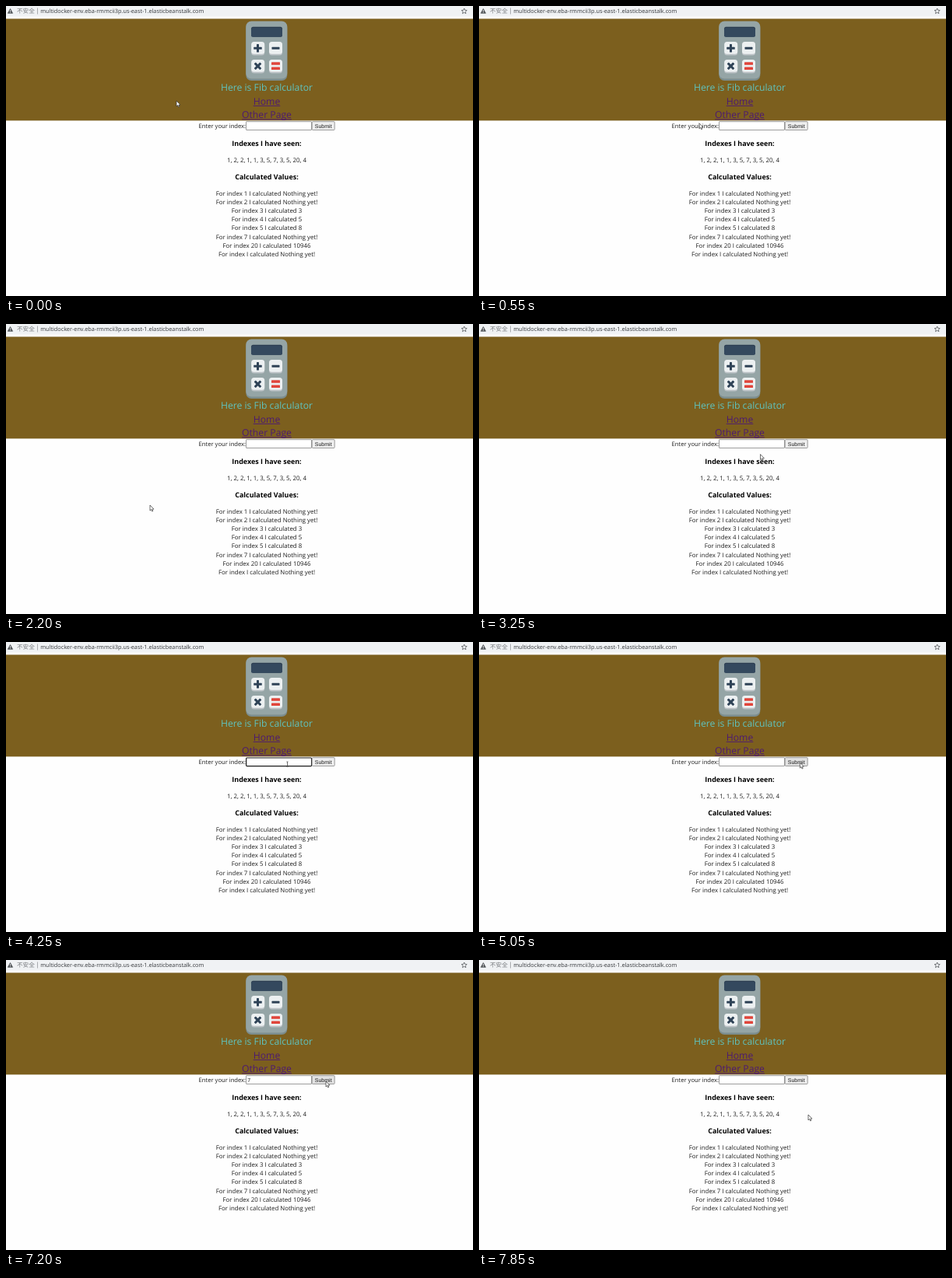
An HTML page with a canvas for the animation above (8 s loop, 600x373 px).

```html
<!DOCTYPE html>
<html lang="en">
<head>
<meta charset="utf-8">
<title>Fib calculator</title>
<style>
html, body { margin: 0; width: 100%; height: 100%; overflow: hidden; background: #fefefe; }
canvas { display: block; width: 600px; height: 373px; }
</style>
</head>
<body>
<canvas id="stage" width="600" height="373"></canvas>
<script>
const ctx = document.getElementById('stage').getContext('2d');
const LOOP = 8000;
const UI = '"Open Sans", "Noto Sans", sans-serif';
const ARIAL = '"Liberation Sans", Arial, sans-serif';
const CJK = '"Noto Sans CJK SC", "Noto Sans CJK", sans-serif';
const CENTER = 335;

// Pointer stops: time, x, y
const path = [
  [50, 219, 122], [500, 280, 150], [850, 331, 163], [1350, 342, 159.6],
  [1700, 337, 165], [2200, 185, 233], [2330, 181, 238], [2550, 288, 242],
  [3400, 368, 161], [3650, 361, 157], [4250, 361, 157], [4800, 411, 155],
  [5000, 413, 155], [5800, 360, 159], [6500, 360, 159], [7050, 411, 156],
  [7350, 411, 156], [7600, 429, 181], [7850, 423, 199]
];
const results = [[1, ''], [2, ''], [3, 3], [4, 5], [5, 8], [7, ''], [20, 10946], ['', '']];

function rect(x, y, w, h, color) {
  ctx.fillStyle = color;
  ctx.fillRect(x, y, w, h);
}

function round(x, y, w, h, r, color) {
  ctx.fillStyle = color;
  ctx.beginPath();
  ctx.roundRect(x, y, w, h, r);
  ctx.fill();
}

function frame(x, y, w, h, r, color, width) {
  ctx.strokeStyle = color;
  ctx.lineWidth = width;
  ctx.beginPath();
  ctx.roundRect(x, y, w, h, r);
  ctx.stroke();
}

function text(str, x, y, size, { color = '#1c1c1c', align = 'left', font = UI, weight = 400 } = {}) {
  ctx.font = `${weight} ${size}px ${font}`;
  ctx.textRendering = 'geometricPrecision';
  ctx.textAlign = align;
  ctx.fillStyle = color;
  ctx.fillText(str, x, y);
}

function poly(points, fill, stroke, width = 1) {
  ctx.beginPath();
  points.forEach(([x, y]) => ctx.lineTo(x, y));
  ctx.closePath();
  if (fill) { ctx.fillStyle = fill; ctx.fill(); }
  if (stroke) {
    ctx.strokeStyle = stroke;
    ctx.lineWidth = width;
    ctx.lineJoin = 'round';
    ctx.stroke();
  }
}

function bar(x, y, len, angle, color, width = 3) {
  ctx.save();
  ctx.translate(x, y);
  ctx.rotate(angle);
  round(-len / 2, -width / 2, len, width, 0.6, color);
  ctx.restore();
}

function addressBar() {
  rect(0, 0, 600, 13.5, '#f0f2f4');
  rect(0, 13.5, 600, 3, '#fcfcfd');
  poly([[5.5, 3.6], [8.6, 9.3], [2.4, 9.3]], '#55585c', '#55585c', 0.8);
  rect(5.1, 5.2, 0.9, 2, '#f0f2f4');
  rect(5.1, 7.8, 0.9, 0.9, '#f0f2f4');
  text('不安全', 14, 9.2, 7.6, { color: '#75787c', font: CJK });
  rect(40.2, 2.5, 0.7, 8, '#8a8d91');
  text('multidocker-env.eba-rmmcii3p.us-east-1.elasticbeanstalk.com', 44.3, 9.2, 7.31, { color: '#34373b' });
  const star = Array.from({ length: 10 }, (_, i) => {
    const r = i % 2 ? 1.7 : 3.7, a = i * Math.PI / 5 - Math.PI / 2;
    return [588.7 + r * Math.cos(a), 6.7 + r * Math.sin(a)];
  });
  poly(star, null, '#54575b', 0.8);
}

function calculator() {
  round(308.3, 21, 53, 75, 7, '#7c8d8e');
  round(308.3, 19.5, 53, 74, 7, '#95a5a6');
  round(315, 26.7, 40, 13, 2.5, '#2b3d50');
  round(315, 28, 40, 11.7, 2.5, '#34495e');
  for (const x of [315.2, 338]) for (const y of [46, 69]) {
    round(x, y + 1.5, 17, 16, 3.5, '#bdc3c7');
    round(x, y, 17, 15.7, 3.5, '#ecf0f1');
  }
  const ink = '#2f4357', red = '#e0453b';
  bar(323.5, 54.3, 10.5, 0, ink);
  bar(323.5, 54.3, 10.5, Math.PI / 2, ink);
  bar(346.5, 54.3, 10, 0, ink);
  bar(323.5, 77.3, 10.8, Math.PI / 4, ink);
  bar(323.5, 77.3, 10.8, -Math.PI / 4, ink);
  bar(346.5, 74, 11, 0, red, 3.5);
  bar(346.5, 80.3, 11, 0, red, 3.5);
}

function link(label, y) {
  const color = '#4d1a72';
  text(label, CENTER, y, 12.2, { color, align: 'center' });
  const w = ctx.measureText(label).width;
  rect(CENTER - w / 2, y + 1.2, w, 0.9, color);
}

function header() {
  rect(0, 16.4, 600, 131, '#7c5f1e');
  calculator();
  text('Here is Fib calculator', CENTER, 109.3, 12.2, { color: '#5fc3bf', align: 'center' });
  link('Home', 126.8);
  link('Other Page', 144.2);
}

function form(t, x, y) {
  const focused = (t >= 3650 && t < 4850) || (t >= 5850 && t < 7150);
  const value = t >= 6700 && t < 7400 ? '7' : '';
  const since = t - (t < 5000 ? 3650 : t < 6700 ? 5850 : 6700);
  const hover = x > 393 && x < 422 && y > 148 && y < 160;

  text('Enter your index:', 247.6, 156.7, 7.62);
  rect(308.5, 148.5, 84, 11, '#fff');
  if (focused) frame(308.6, 149, 84, 10.6, 1, '#1c1c1c', 1.2);
  else frame(308.5, 148.7, 84, 10.8, 0.5, '#858585', 0.8);
  if (value) text(value, 310.2, 156.5, 7, { font: ARIAL });
  if (focused && since % 1000 < 500) rect(value ? 314.4 : 310.4, 150.5, 0.7, 7.4, '#333');

  round(393.2, 148.7, 29, 10.8, 1, hover ? '#e2e2e2' : '#efefef');
  frame(393.2, 148.7, 29, 10.8, 1, '#858585', 0.8);
  text('Submit', 407.7, 156.5, 7, { font: ARIAL, align: 'center' });
}

function lists() {
  const mid = { align: 'center' }, head = { align: 'center', weight: 700, color: '#000' };
  text('Indexes I have seen:', CENTER, 179.5, 8.95, head);
  text('1, 2, 2, 1, 1, 3, 5, 7, 3, 5, 20, 4', CENTER, 201, 7.87, mid);
  text('Calculated Values:', CENTER, 222.8, 8.95, head);
  results.forEach(([index, value], i) => {
    const words = ['For index', index, 'I calculated', value || 'Nothing yet!'];
    text(words.filter(w => w !== '').join(' '), CENTER, 244 + i * 11.1, 7.87, mid);
  });
}

function pointerAt(t) {
  const next = path.findIndex(p => p[0] > t);
  if (next === 0) return path[0].slice(1);
  if (next < 0) return path[path.length - 1].slice(1);
  const [t0, x0, y0] = path[next - 1], [t1, x1, y1] = path[next];
  const u = (t - t0) / (t1 - t0), k = u * u * (3 - 2 * u);
  return [x0 + (x1 - x0) * k, y0 + (y1 - y0) * k];
}

function pointer(x, y) {
  const overInput = x > 308 && x < 393 && y > 148 && y < 159.4;
  if (overInput) {
    rect(x + 0.1, y - 3, 0.8, 6.2, '#444');
    rect(x - 0.8, y - 3.3, 2.6, 0.6, '#555');
    rect(x - 0.8, y + 2.9, 2.6, 0.6, '#555');
    return;
  }
  const shape = [[0, 0], [0, 7], [1.6, 5.6], [2.7, 8], [3.8, 7.5], [2.8, 5.2], [4.9, 5.1]];
  poly(shape.map(([dx, dy]) => [x + dx, y + dy]), '#fff', '#303030', 0.7);
}

function draw(now) {
  const t = now % LOOP;
  const [x, y] = pointerAt(t);
  rect(0, 0, 600, 373, '#fefefe');
  addressBar();
  header();
  form(t, x, y);
  lists();
  pointer(x, y);
  requestAnimationFrame(draw);
}
requestAnimationFrame(draw);
</script>
</body>
</html>
```
